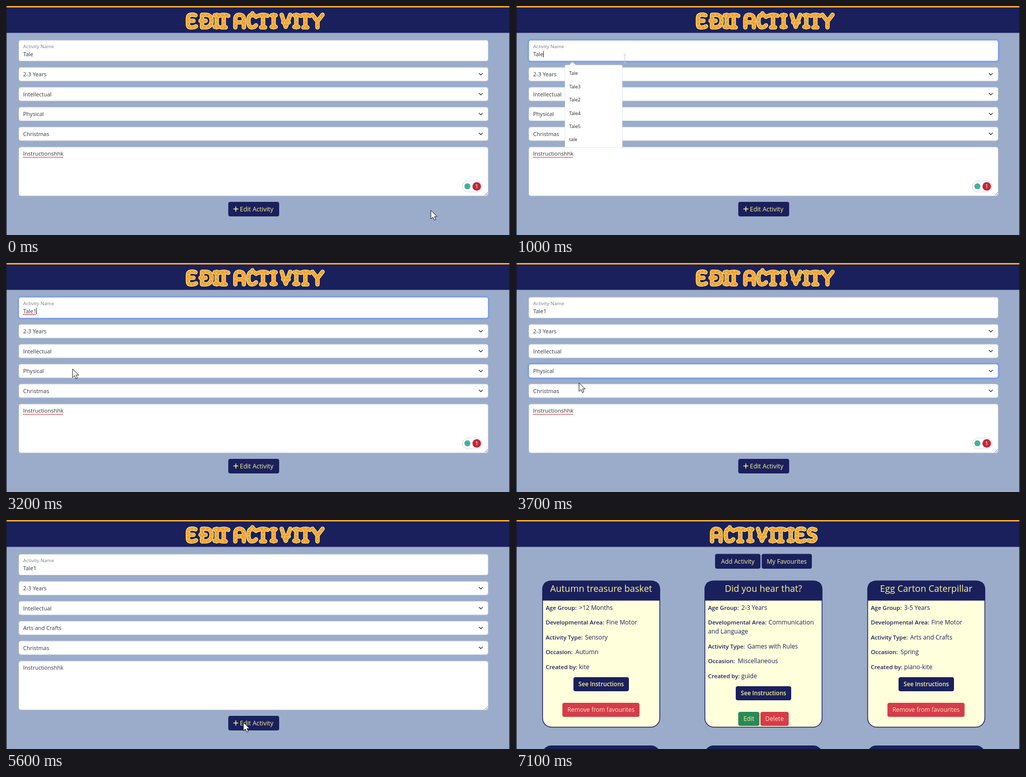
These frames come from a looping animation (1000 px wide and 456 px high, 7.2 s). An HTML page:

```html
<!DOCTYPE html>
<html lang="en">
<head>
<meta charset="utf-8">
<title>Edit Activity</title>
<style>
html, body { margin: 0; height: 100%; overflow: hidden; background: #9bacca; }
svg { display: block; width: 100%; height: 100%; font: 11px "Open Sans", sans-serif; }
</style>
</head>
<body>
<svg id="stage" viewBox="0 0 1000 456"></svg>
<script>
const NAVY = '#1a205c', YELLOW = '#fdf696', INK = '#30353b', RED = '#d63c4a', RING = '#7f9fe4';

const rect = (x, y, w, h, fill, r = 0, more = '') =>
  `<rect x="${x}" y="${y}" width="${w}" height="${h}" rx="${r}" fill="${fill}" ${more}/>`;
const text = (x, y, s, size = 11, fill = INK, more = '') =>
  `<text x="${x}" y="${y}" font-size="${size}" fill="${fill}" ${more}>${s.replace('>', '&gt;')}</text>`;
const centred = (x, y, s, size, fill, more = '') => text(x, y, s, size, fill, 'text-anchor="middle" ' + more);
const line = (d, stroke, width, more = '') =>
  `<path d="${d}" fill="none" stroke="${stroke}" stroke-width="${width}" ${more}/>`;
const group = (id, body) => `<g id="${id}">${body}</g>`;

// Display lettering: each letter is a thick outlined stroke with a row of dots
const GLYPHS = {
  E: 'M19 4Q15 2 9 3Q4 4 4 10V21Q4 28 9 28Q15 29 20 26M4 15H15',
  D: 'M4 3V28H11Q23 27 23 15Q23 3 11 3H4M1 15H11',
  I: 'M5 3V28M1 4H9M1 27H9',
  T: 'M1 5Q10 1 19 5M10 4V28M6 28H14',
  A: 'M3 28V12Q3 3 11 3Q20 3 20 12V28M3 18H20',
  C: 'M18 7Q15 3 10 3Q3 4 3 15Q3 28 10 28Q15 28 18 24M11 0V4',
  V: 'M3 3L11 27L20 3M6 18H17',
  Y: 'M2 3L12 16L22 3M12 16V28',
  S: 'M17 5Q6 0 4 9Q5 14 10 15Q18 17 17 23Q13 30 3 26'
};
function lettering(word, xs) {
  const layer = (color, width, more = '') => [...word].map((c, i) =>
    line(GLYPHS[c], color, width, `transform="translate(${xs[i]} 14.5)" ${more}`)).join('');
  return `<g role="img" aria-label="${word}" stroke-linecap="round" stroke-linejoin="round">` +
    layer('#fff07c', 8.6) + layer('#f69c32', 5.8) +
    layer('#fff07c', 1.9, 'stroke-dasharray=".1 7.5" stroke-dashoffset="-3"') + '</g>';
}

const box = (y, h) => rect(25.5, y, 931, h, '#fff', 4, 'stroke="#cdd4e0"');
const ring = (y, h) => rect(24.2, y - 1.3, 933.6, h + 2.6, 'none', 5, `stroke="${RING}" stroke-width="3"`);
const squiggle = (x, y, w) => line(`M${x} ${y}h${w}`, '#e0484c', 1.8, 'stroke-dasharray="2.4 .8"');
const button = (x, y, w, h, s, fill, color = YELLOW, size = 12.2, more = '') =>
  rect(x, y, w, h, fill, 4) + centred(x + w / 2, y + h / 2 + 4.3, s, size, color, more);

function editPage() {
  const selects = ['2-3 Years', 'Intellectual', 'Physical', 'Christmas'].map((s, i) => {
    const y = 122.3 + i * 39.6;
    return box(y, 27) + line(`M938.4 ${y + 11.5}l3.7 3.7 3.7-3.7`, INK, 1.4) +
      text(34, y + 17.6, s, 11, INK, `id="select${i}"`);
  }).join('');
  const rows = ['Tale', 'Tale3', 'Tale2', 'Tale4', 'Tale5', 'tale'];
  const pointer = '<path d="M105 118l7-6.5 7 6.5z" fill="#fff"/>';
  return lettering('EDITACTIVITY', [357, 385, 413, 422, 452, 478, 500, 526, 544, 571, 584, 606]) +
    rect(25.5, 68.3, 931, 41.2, '#fff', 4, 'id="name" stroke="#cdd4e0"') +
    group('nameRing', ring(68.3, 41.2)) +
    text(34, 84, 'Activity Name', 9.6, '#777d84') +
    text(34, 100, '', 11, INK, 'id="value"') +
    line('M0 89.5V102', '#222', 1, 'id="caret"') +
    group('nameSpell', squiggle(34, 102.5, 26)) +
    selects + group('typeRing', ring(201.5, 27)) +
    box(281, 97) + text(34, 298.3, 'Instructionshhk') +
    line('M950 377l6-6M953.5 377l2.5-2.5', '#777', 1) +
    group('checker', squiggle(34, 301.3, 79) +
      rect(905.5, 348.5, 39, 21.5, '#fff', 10.8, 'stroke="#cdd3df"') +
      '<circle cx="915.5" cy="359" r="6" fill="#41b39c"/><circle cx="934" cy="359.3" r="8.5" fill="#c1283a"/>' +
      centred(934, 363.2, '1', 11, '#fff')) +
    rect(441, 390, 101, 29, NAVY, 4) +
    line('M451 404.3h10M456 399.3v10', YELLOW, 1.6) +
    text(464, 408.8, 'Edit Activity', 12.4, YELLOW) +
    group('longList', pointer + rect(97, 117.5, 114, 164.5, '#fff', 2, 'stroke="#c9d2e2" stroke-width=".6"') +
      rows.map((s, i) => text(105.5, 137.3 + i * 26.4, s, 9.3, '#222')).join('')) +
    group('shortList', pointer + rect(97, 117.5, 115, 33, '#fff', 2, 'stroke="#c9d2e2" stroke-width=".6"') +
      rect(97, 121, 115, 28, '#eef1f7', 0, 'id="hover"') + text(105.5, 137.3, 'Tale123', 9.3, '#222'));
}

const LABELS = [['Age Group:', 66], ['Developmental Area:', 120], ['Activity Type:', 78], ['Occasion:', 59], ['Created by:', 66]];
function card(x, title, values, own) {
  const mid = x + 117;
  let y = 179, out = rect(x + .7, 121.2, 232.6, 291.3, '#ffffdc', 18, `stroke="${NAVY}" stroke-width="1.5"`) +
    `<path d="M${x} 160.5V139q0-18 18-18h198q18 0 18 18v21.5z" fill="${NAVY}"/>` +
    centred(mid, 143, title, 18, YELLOW);
  values.forEach((value, i) => {
    const [label, offset] = LABELS[i], [first, rest] = value.split('|');
    out += text(x + 7, y, label, 11.5, NAVY, 'font-weight="600"') + text(x + 7 + offset, y, first, 12.1, NAVY);
    if (rest) out += text(x + 7, y += 18, rest, 12.1, NAVY);
    y += 29.4;
  });
  out += button(mid - 55, y - 13, 110, 28, 'See Instructions', NAVY, YELLOW, 11.6, 'font-weight="600"');
  return out + (own
    ? button(mid - 50, 382, 42, 28, 'Edit', '#2a8a57') + button(mid - 6, 382, 56, 28, 'Delete', RED, '#ffe6c0')
    : button(mid - 77, 364, 153, 28, 'Remove from favourites', RED, '#ffe6c0', 11.9));
}

function listPage() {
  return lettering('ACTIVITIES', [386, 413, 435, 460, 477, 504, 515, 540, 553, 577]) +
    button(395, 67.5, 90, 29.5, 'Add Activity', NAVY) +
    button(487.5, 67.5, 99.5, 29.5, 'My Favourites', NAVY) +
    card(52, 'Autumn treasure basket', ['>12 Months', 'Fine Motor', 'Sensory', 'Autumn', 'kite']) +
    card(374, 'Did you hear that?', ['2-3 Years', 'Communication|and Language', 'Games with Rules', 'Miscellaneous', 'guide'], true) +
    card(697, 'Egg Carton Caterpillar', ['3-5 Years', 'Fine Motor', 'Arts and Crafts', 'Spring', 'piano-kite']) +
    [52, 374, 697].map(x => rect(x, 449, 234, 40, NAVY, 18)).join('');
}

document.getElementById('stage').innerHTML =
  rect(0, 0, 1000, 456, '#9bacca') + rect(0, 3, 1000, 50.5, NAVY) + rect(0, 0, 1000, 3, '#f9a330') +
  group('edit', editPage()) + group('list', listPage()) +
  rect(0, 0, 1.2, 456, '#15171f') + rect(998.7, 0, 1.3, 456, '#15171f') +
  group('cursor', '<path id="arrow" d="M0 0V17l4-3.8 2.7 6.3 3-1.3-2.7-6h5.4z" fill="#fff" stroke="#111"/>' +
    line('M-3-8h6M0-8V8M-3 8h6', '#c3c8d2', 1.2, 'id="beam"'));

const $ = id => document.getElementById(id);
const show = (id, on) => $(id).setAttribute('display', on ? 'inline' : 'none');

// Pointer path: time, x, y
const PATH = [[0, 843, 407], [800, 216, 105], [1900, 216, 105], [2300, 174, 144], [2700, 150, 185],
  [3200, 132, 211], [3500, 125, 216], [3800, 125, 250], [4300, 391, 403], [4400, 391, 403],
  [4700, 471, 403], [6000, 471, 403], [6500, 471, 470], [7200, 471, 470]];
function pointerAt(t) {
  const i = PATH.findIndex(p => p[0] > t);
  const [t0, x0, y0] = PATH[i - 1], [t1, x1, y1] = PATH[i];
  const k = (t - t0) / (t1 - t0);
  return [x0 + (x1 - x0) * k, y0 + (y1 - y0) * k];
}

function draw(now) {
  const t = Math.floor(now % 7200 / 100) * 100;
  const within = (a, b) => t >= a && t < b;
  const listed = t >= 5700, preview = within(2100, 2600), typed = t >= 1600;

  show('edit', !listed);
  show('list', listed);
  show('nameRing', within(800, 3600));
  show('typeRing', within(3600, 5000));
  show('longList', within(900, 1600));
  show('shortList', within(1600, 2700));
  show('hover', preview);
  show('nameSpell', within(2800, 3600));
  show('checker', t < 5000);
  $('name').setAttribute('fill', preview ? '#e8f0fe' : '#fff');
  $('value').textContent = preview ? 'Tale123' : typed ? 'Tale1' : 'Tale';
  $('value').setAttribute('font-size', preview ? 10 : 11);
  $('select2').textContent = t < 3800 ? 'Physical' : 'Arts and Crafts';
  show('caret', within(800, 3600) && !within(1400, 1600) && !preview);
  $('caret').setAttribute('transform', `translate(${typed ? 60.5 : 54.5} 0)`);

  const [x, y] = pointerAt(t);
  const overText = !listed && x > 25 && x < 957 && (y > 68 && y < 110 || y > 281 && y < 378);
  $('cursor').setAttribute('transform', `translate(${x} ${y})`);
  show('arrow', !overText);
  show('beam', overText);
  requestAnimationFrame(draw);
}
requestAnimationFrame(draw);
</script>
</body>
</html>
```
